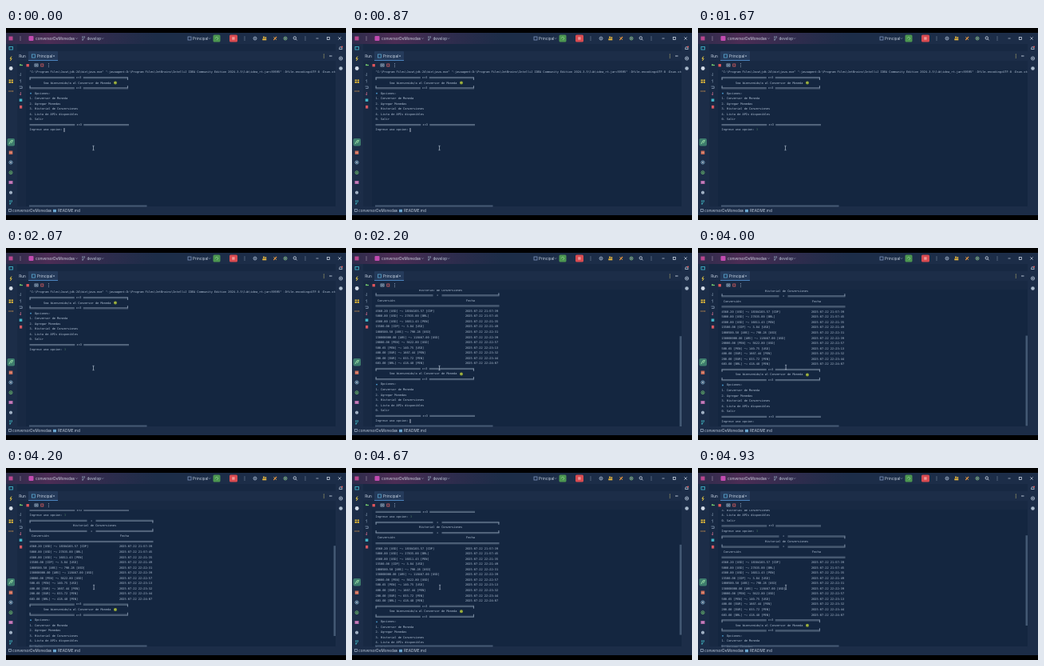
Animation of 426 by 240 pixels, one loop 5590 ms. Source, as an HTML page with a canvas:

```html
<!DOCTYPE html>
<html lang="es">
<head>
<meta charset="utf-8">
<title>Conversor de Moneda</title>
<style>
html, body { margin: 0; width: 100%; height: 100%; overflow: hidden; background: #000; }
canvas { display: block; width: 426px; height: 240px; }
</style>
</head>
<body>
<canvas id="stage" width="426" height="240"></canvas>
<script>
const ctx = document.getElementById('stage').getContext('2d');
const LOOP = 5590, STEP = 1000 / 15;
const LINE = 6.55, TOP = 55.5, LEFT = 29.5, END_SCROLL = 88;
const VIEW = { x: 25, y: 52, w: 388, h: 172 };
const MONO = '3.6px "DejaVu Sans Mono", monospace';
const UI = '"Inter", sans-serif';
const INK = '#b3c3d6', SOFT = '#8fa1b8', PANEL = '#1c2d48', CONSOLE = '#142640';

function rect(x, y, w, h, color) {
  ctx.fillStyle = color;
  ctx.fillRect(x, y, w, h);
}
function round(x, y, w, h, r, color) {
  ctx.fillStyle = color;
  ctx.beginPath();
  ctx.roundRect(x, y, w, h, r);
  ctx.fill();
}
function dot(x, y, r, color) {
  ctx.fillStyle = color;
  ctx.beginPath();
  ctx.arc(x, y, r, 0, Math.PI * 2);
  ctx.fill();
}
function ring(x, y, r, color) {
  ctx.strokeStyle = color;
  ctx.lineWidth = 0.9;
  ctx.beginPath();
  ctx.arc(x, y, r, 0, Math.PI * 2);
  ctx.stroke();
}
function path(points, color, width = 0.8) {
  ctx.strokeStyle = color;
  ctx.lineWidth = width;
  ctx.beginPath();
  points.forEach(([x, y]) => ctx.lineTo(x, y));
  ctx.stroke();
}
function box(x, y, w, h, color) {
  ctx.strokeStyle = color;
  ctx.lineWidth = 0.8;
  ctx.strokeRect(x, y, w, h);
}
function label(text, x, y, color = INK, font = `4.7px ${UI}`, align = 'left') {
  ctx.font = font;
  ctx.textAlign = align;
  ctx.textBaseline = 'middle';
  ctx.fillStyle = color;
  ctx.fillText(text, x, y);
}
const mono = (text, x, y, color = INK) => label(text, x, y, color, MONO);
const chevron = (x, y) => path([[x - 1.2, y - 0.6], [x, y + 0.6], [x + 1.2, y - 0.6]], SOFT, 0.6);
const dots = (x, y, color) => [-2, 0, 2].forEach(d => dot(x, y + d, 0.6, color));
function cross(x, y, r, color) {
  path([[x - r, y - r], [x + r, y + r]], color, 0.7);
  path([[x + r, y - r], [x - r, y + r]], color, 0.7);
}
function branch(x, y, color) {
  path([[x - 1, y - 2], [x - 1, y + 2], [x + 1.2, y - 0.5], [x + 1.2, y - 2]], color, 0.6);
  [[-1, -2], [-1, 2], [1.2, -2]].forEach(([a, b]) => dot(x + a, y + b, 0.7, color));
}

function drawTitleBar() {
  rect(0, 6, 426, 14, PANEL);
  const glow = ctx.createLinearGradient(0, 0, 190, 0);
  glow.addColorStop(0, 'rgba(112,42,90,.22)');
  glow.addColorStop(0.28, 'rgba(124,44,98,.5)');
  glow.addColorStop(1, 'rgba(90,40,90,0)');
  rect(0, 6, 190, 14, glow);
  rect(3.5, 10.5, 5, 5, '#b9468f');
  dots(18, 13, '#c3b5cb');
  round(28.5, 10, 6, 6, 1, '#c24bb0');
  label('conversorDeMonedas', 37, 13.2, '#d0d5e2');
  chevron(88.5, 13);
  branch(97, 13, SOFT);
  label('develop', 101.5, 13.2, '#c2cedd');
  chevron(121, 13);

  box(228, 11, 4, 4, '#7d94bd');
  label('Principal', 234, 13.2, '#c9d4e2');
  chevron(255, 13);
  round(259.5, 8.5, 9, 9, 1.5, '#4c9650');
  path([[262, 13], [264, 11], [266, 13], [264, 15]], '#86c989');
  round(280, 8.5, 10, 9, 1.5, '#d94b50');
  rect(283.2, 11.3, 3.4, 3.4, '#ef9697');
  dots(299, 13, SOFT);
  ring(312, 13, 2, '#9fb0c7');
  dot(312, 13, 0.8, '#9fb0c7');
  dot(323, 11.7, 1.1, '#e8b83f');
  dot(325.3, 12, 1, '#e8b83f');
  rect(321.3, 13.3, 5, 2, '#e8b83f');
  path([[335.3, 15], [339, 11]], '#e48a3d', 1.2);
  path([[335.3, 11], [339, 15]], '#d9ad54');
  ring(350, 13, 2, '#7cb77f');
  dot(350, 13, 0.8, '#d0dfd3');
  ring(361.8, 12.5, 1.7, '#c8d3e2');
  path([[363, 13.8], [364.6, 15.4]], '#c8d3e2');
  dots(375, 13, SOFT);
  path([[388.5, 13], [391.5, 13]], '#c8d3e2', 0.7);
  box(402.3, 11.5, 3, 3, '#c8d3e2');
  cross(418, 13, 1.7, '#c8d3e2');
}

function drawSideBars() {
  rect(0, 20, 14, 203, PANEL);
  rect(413, 20, 13, 203, PANEL);
  box(4, 23.5, 4.5, 3.5, '#43bfd3');
  path([[7, 35.5], [5, 38.2], [7.2, 38.2], [5.4, 41]], '#e6c845', 1);
  dot(6.2, 50.5, 2.4, '#d5dde8');
  [[3.6, 64.5], [6.6, 64.5], [3.6, 67], [6.6, 67]].forEach(([x, y]) => rect(x, y, 2.3, 1.8, '#e6bc38'));
  [4, 6.2, 8.4].forEach(x => dot(x, 79, 0.7, '#d9984c'));

  round(1.5, 138, 9.5, 9.5, 1.8, '#3d7c6d');
  path([[4, 145], [6, 141], [8.5, 140.5], [6.5, 144]], '#9be0a8', 1);
  rect(3.7, 153.5, 4.6, 4.5, '#c96855');
  path([[4, 155.7], [8, 155.7]], '#efc0a4', 0.6);
  ring(6, 168, 2.1, '#7fabc8');
  dot(6, 168, 0.9, '#c7d8e6');
  ring(6, 180.7, 2, '#67b36c');
  dot(6, 180.7, 0.9, '#67b36c');
  rect(3.5, 191, 5, 4, '#b465a9');
  path([[4.2, 193], [7.6, 193]], '#e7c7e5', 0.6);
  dot(6, 205.7, 2, '#b8c7d8');
  path([[6, 203], [6, 208]], '#667b96', 0.6);
  branch(6, 218, '#45c4d0');

  path([[417.5, 26.5], [418.2, 23.8], [420.5, 23.8], [421.2, 26.5], [417.5, 26.5]], '#bdcad9');
  dot(421, 23.5, 1, '#e45c5c');
  ring(419.5, 38, 2.1, '#abbacd');
  dot(419.5, 38, 0.9, '#abbacd');
  dot(419.5, 50.5, 2.3, '#a9b9cb');
}

function drawRunPanel() {
  rect(14, 20, 399, 9, '#172842');
  rect(14, 29, 399, 12, PANEL);
  label('Run', 16.3, 35.2, '#cbd6e4');
  round(28, 29, 37, 12, 1, '#253b5b');
  rect(28, 40, 37, 1, '#4b83bd');
  box(32.5, 33, 4, 4, '#59a9d2');
  label('Principal', 39, 35.2, '#d1dbe8');
  cross(60, 35, 1, SOFT);
  dots(398.3, 35, '#d6c874');
  path([[405, 35], [408.5, 35]], '#c3cfdd', 0.9);

  rect(14, 41, 11, 182, '#182943');
  rect(25, 41, 388, 182, CONSOLE);
  rect(14, 41, 399, 11, '#182943');
  path([[17, 46.5], [21, 46.5]], '#6dbd69', 1.3);
  dot(18, 46, 1, '#6dbd69');
  rect(25.5, 45, 3.4, 3.4, '#e0555a');
  box(36, 45, 4, 3, '#a7bdd2');
  dot(38, 46.5, 0.8, '#a7bdd2');
  box(43.8, 45, 3, 3, '#d95f61');
  dots(53.5, 46.5, SOFT);

  path([[18.4, 56], [18.4, 60], [17, 58.6]], '#647890');
  path([[18.4, 68.4], [18.4, 64.5], [17, 66]], '#647890');
  path([[16.5, 73], [20.2, 73], [20.2, 75.5], [17, 75.5]], '#8296ae');
  path([[18.4, 80], [18.4, 84], [17, 82.5]], '#c06886');
  rect(16.7, 88.5, 3.6, 3.4, '#43b6c6');
  rect(17, 96.8, 3.2, 3.8, '#d65961');
}

function drawStatusBar() {
  rect(0, 223, 426, 11, PANEL);
  box(3.5, 226.5, 3, 3, SOFT);
  label('conversorDeMonedas', 8, 228.6, '#c2cedd');
  path([[54.3, 227.4], [55.4, 228.6], [54.3, 229.8]], SOFT, 0.6);
  rect(59, 226.8, 4, 3.4, '#6aa6cf');
  label('README.md', 65, 228.6, '#c2cedd');
}

// Double rule with an ornament in its gap; drop is +1 / -1 for box corners.
function rule(y, right, mark, drop = 0) {
  const middle = (LEFT + right) / 2, gap = mark ? 5.5 : 0;
  for (const d of [-0.5, 0.7]) {
    path([[LEFT, y + d], [middle - gap, y + d]], '#8fa1b6', 0.55);
    path([[middle + gap, y + d], [right, y + d]], '#8fa1b6', 0.55);
  }
  if (drop) [LEFT + 0.6, right - 0.6].forEach(x => path([[x, y], [x, y + 3 * drop]], '#8fa1b6', 0.9));
  if (mark) label(mark, middle, y, INK, MONO, 'center');
}

const COMMAND = '"C:\\Program Files\\Java\\jdk-24\\bin\\java.exe" "-javaagent:D:\\Program Files\\JetBrains\\IntelliJ IDEA Community Edition 2024.3.5\\lib\\idea_rt.jar=59595" -Dfile.encoding=UTF-8 -Dsun.stdout.encoding=UTF-8';
const OPTIONS = ['1. Conversor de Moneda', '2. Agregar Monedas', '3. Historial de Conversiones', '4. Lista de APIs disponibles', '0. Salir'];
const HISTORY = `4560.20 [USD] ─→ 18384103.57 [COP]|21:57:39
5000.00 [USD] ─→ 27835.00 [BRL]|21:57:45
4500.00 [USD] ─→ 16011.43 [PEN]|22:21:35
15500.00 [COP] ─→ 3.84 [USD]|22:21:49
1000500.50 [ARS] ─→ 790.28 [USD]|22:22:31
150000000.00 [ARS] ─→ 118467.00 [USD]|22:22:39
20000.00 [PEN] ─→ 5622.80 [USD]|22:22:57
500.65 [PEN] ─→ 140.75 [USD]|22:23:13
400.00 [EUR] ─→ 1667.44 [PEN]|22:23:32
200.00 [EUR] ─→ 833.72 [PEN]|22:23:44
603.00 [BRL] ─→ 418.48 [PEN]|22:24:07`.split('\n').map(row => row.split('|'));

function drawMenu(first, lineY) {
  rule(lineY(first), 153, 'ε×3', 1);
  mono('Sea bienvenido/a al Conversor de Moneda', 47, lineY(first + 1));
  dot(137, lineY(first + 1), 2, '#8fa535');
  dot(136.6, lineY(first + 1) - 0.3, 0.8, '#b9bd57');
  rule(lineY(first + 2), 153, 'ε×3', -1);
  dot(31, lineY(first + 3), 0.9, '#4b9fd3');
  mono('Opciones:', 36, lineY(first + 3));
  OPTIONS.forEach((text, i) => mono(text, LEFT, lineY(first + 4 + i)));
  rule(lineY(first + 9), 154, 'ε×3');
  mono('Ingrese una opcion:', LEFT, lineY(first + 10));
}

function drawHistory(lineY) {
  rule(lineY(12), 184.5, '✦', 1);
  mono('Historial de Conversiones', 84, lineY(13));
  rule(lineY(14), 184.5, '✦', -1);
  mono('Conversión', 32, lineY(15));
  mono('Fecha', 143, lineY(15));
  rule(lineY(16), 184.5);
  HISTORY.forEach(([text, hour], i) => {
    mono(text, LEFT, lineY(17 + i));
    mono('2025-07-22 ' + hour, 142, lineY(17 + i));
  });
}

function ease(t, start, end) {
  const p = Math.min(1, Math.max(0, (t - start) / (end - start)));
  return p * p * (3 - 2 * p);
}
const within = (t, from, to) => t >= from && t < to;

function drawConsole(t) {
  const typed = t >= 870, printed = t >= 2130;
  const wheel = ease(t, 3970, 4200) + ease(t, 4600, 4930);
  const scroll = printed ? END_SCROLL - wheel * 3 * LINE : 0;
  const lineY = n => TOP + n * LINE - scroll;

  ctx.save();
  ctx.beginPath();
  ctx.rect(VIEW.x, VIEW.y, VIEW.w, VIEW.h);
  ctx.clip();
  mono(COMMAND, LEFT, lineY(0));
  drawMenu(1, lineY);
  if (typed) mono('3', 73, lineY(11), '#4c7a60');
  if (printed) {
    drawHistory(lineY);
    drawMenu(28, lineY);
  }
  const caretOn = t < 200 || within(t, 660, 1660) || within(t, 2190, 2730) || within(t, 3190, 3730);
  if (caretOn) {
    const x = typed && !printed ? 75.3 : 72.6;
    rect(x, lineY(printed ? 38 : 11) - 2.5, 0.8, 5, '#d5deea');
  }
  ctx.restore();

  rect(29, 221.5, 147.5, 2, '#465a75');
  if (printed) {
    const ratio = VIEW.h / 260;
    rect(410.5, VIEW.y + scroll * ratio, 2.5, VIEW.h * ratio - 1, '#435873');
  }
}

function drawPointer(t) {
  const move = ease(t, 3800, 4000), x = 109.5 + move * 0.6, y = 150 - move;
  path([[x, y - 2.6], [x, y + 2.6]], '#b5c2d2', 0.7);
  for (const d of [-2.7, 2.7]) path([[x - 1.1, y + d], [x + 1.1, y + d]], '#b5c2d2', 0.6);
}

function draw(t) {
  rect(0, 0, 426, 240, '#000');
  drawTitleBar();
  drawSideBars();
  drawRunPanel();
  drawStatusBar();
  drawConsole(t);
  drawPointer(t);
}

const begin = performance.now();
function tick() {
  const t = (performance.now() - begin) % LOOP;
  draw(Math.floor((t + 5) / STEP) * STEP + 1);
  requestAnimationFrame(tick);
}
tick();
</script>
</body>
</html>
```
